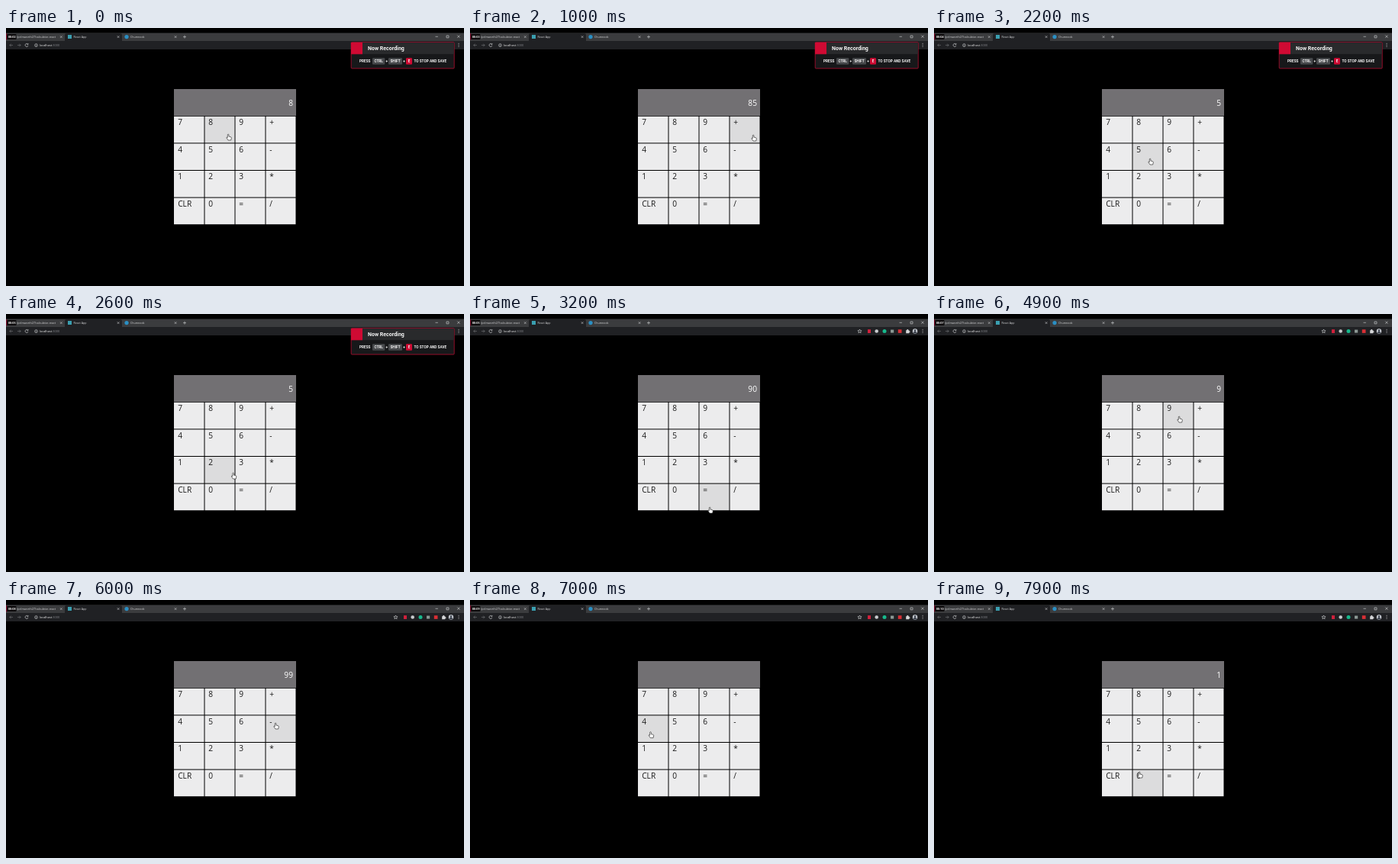
Animation, 600 px wide and 338 px high, one loop 8000 ms. Source, as an HTML page:

```html
<!DOCTYPE html>
<html lang="en">
<head>
<meta charset="utf-8">
<title>Calculator</title>
<style>
  html, body { margin: 0; width: 100%; height: 100%; overflow: hidden; background: #000; }
  svg { display: block; width: 100vw; height: 100vh; font-family: "Open Sans", "Noto Sans", sans-serif; }
  .tab { font-size: 3.6px; fill: #d6d7d9; }
  .line { fill: none; stroke: #d6d7d9; stroke-width: .6; }
  .dim { stroke: #77797d; }
  .key { fill: #ececed; }
  .key.on { fill: #dcdcdd; }
  .num { font-size: 10.2px; fill: #1b1b1b; }
  #display { fill: #fff; text-anchor: end; }
  #popup { font-family: Roboto, sans-serif; font-weight: 600; font-size: 4.7px; fill: #f4f4f4; }
</style>
</head>
<body>
<svg viewBox="0 0 600 338" preserveAspectRatio="none">
  <rect width="600" height="338"/>

  <!-- tab strip -->
  <rect y="6.5" width="600" height="10.5" fill="#3b3c3e"/>
  <path d="M77 17V9q0-2 2-2H150q2 0 2 2V17z" fill="#202124"/>
  <g class="tab">
    <text x="14" y="12.9">/pelmworth27/calculator-react</text>
    <text x="88.5" y="12.9">React App</text>
    <text x="163" y="12.9">Chumnook</text>
  </g>
  <rect x="81" y="9" width="5" height="5" fill="#3a9fb0"/>
  <circle cx="158" cy="11.6" r="2.6" fill="#2a8fc4"/>
  <path class="line" d="M71 10.3l2.6 2.6m0-2.6l-2.6 2.6M145.8 10.3l2.6 2.6m0-2.6l-2.6 2.6M220.8 10.3l2.6 2.6m0-2.6l-2.6 2.6M232 11.6h4m-2-2v4M562.5 11.3h3.4M577 10h3v2.8h-3zM591.3 9.6l3.2 3.2m0-3.2l-3.2 3.2"/>
  <rect y="8" width="13.4" height="7" fill="#0c0a0b"/>
  <rect y="7" width="1.2" height="8.5" fill="#7d1230"/>
  <text id="clock" x="3" y="12.8" font-size="3.7" font-weight="700" fill="#fff" font-family="Roboto, sans-serif"></text>

  <!-- toolbar -->
  <rect y="17" width="600" height="11" fill="#202124"/>
  <path class="line dim" d="M9 22.5H4.8m1.9-1.9l-1.9 1.9 1.9 1.9M15 22.5h4.2m-1.9-1.9l1.9 1.9-1.9 1.9"/>
  <path class="line" d="M28.7 21.3a2 2 0 1 0 .3 1.7M29 20v1.6h-1.6"/>
  <circle class="line" cx="39.5" cy="22.6" r="1.9" stroke-width=".4"/>
  <path class="line" d="M39.5 22.3v1.4M39.5 21.3v.4"/>
  <text x="44" y="24" font-size="3.9" fill="#f0f0f0">localhost<tspan fill="#85878b">:3000</tspan></text>
  <path d="M510.5 20l.7 1.7 1.9.1-1.5 1.2.5 1.8-1.6-1-1.6 1 .5-1.8-1.5-1.2 1.9-.1z" class="line" stroke-width=".5"/>
  <rect x="521" y="20.2" width="4" height="4.8" fill="#d0213c"/>
  <circle cx="532.7" cy="22.5" r="2.3" fill="#c9cbce"/>
  <circle cx="543" cy="22.5" r="2.5" fill="#17b98c"/>
  <rect x="551" y="20.6" width="4.2" height="4" fill="#8c9894"/>
  <rect x="560.8" y="20.3" width="4.7" height="4.6" fill="#d92f35"/>
  <path d="M571.2 21.2h1.3a.9.9 0 1 1 1.6 0h1.3v1.3a.8.8 0 1 1 0 1.5v1.2h-4.2z" fill="#d6d7d9"/>
  <circle cx="583" cy="22.5" r="3.2" fill="#c7cbd2"/>
  <path d="M580.6 24.7q.3-1.9 2.4-1.9t2.4 1.9q-2.4 1.6-4.8 0z" fill="#3f4550"/>
  <circle cx="583" cy="21.6" r="1.3" fill="#3f4550"/>
  <path d="M593 20.4h.1m-.1 2h.1m-.1 2h.1" stroke="#d6d7d9" stroke-width=".9" stroke-linecap="round"/>

  <g id="popup">
    <rect x="452.2" y="18.7" width="135" height="34.3" rx="1" fill="#17181a" stroke="#b50f30" stroke-width=".8"/>
    <rect x="467" y="19.2" width="119.8" height="15" fill="#292a2c"/>
    <rect x="452" y="19" width="15" height="15.3" fill="#cf0a33"/>
    <text x="474" y="29.2" font-size="7">Now Recording</text>
    <rect x="480" y="39.2" width="16.3" height="8.6" rx="1" fill="#47494c"/>
    <rect x="501" y="39.2" width="18" height="8.6" rx="1" fill="#47494c"/>
    <rect x="524" y="39.2" width="8" height="8.6" rx="1" fill="#cf0a33"/>
    <text x="463" y="45.2">PRESS</text>
    <g text-anchor="middle">
      <text x="488.2" y="45.2">CTRL</text>
      <text x="498.7" y="45.2">+</text>
      <text x="510" y="45.2">SHIFT</text>
      <text x="521.5" y="45.2">+</text>
      <text x="528" y="45.2">E</text>
    </g>
    <text x="534.5" y="45.2">TO STOP AND SAVE</text>
  </g>

  <rect x="220" y="80" width="160" height="35" fill="#727073"/>
  <text id="display" class="num" x="376" y="101.8"></text>
  <g id="keys"></g>
  <path id="hand" d="M-1.7-3.4q.8-1.1 1.6 0V-.9l2.3.5q1.2.3 1.1 1.5L2.7 4H-1L-3.1 1q-.2-1.2.8-.8l.6.5z" fill="#fff" stroke="#111" stroke-width=".6" stroke-linejoin="round"/>
</svg>
<script>
const LOOP = 8000, STEP = 100;
const LEFT = 220, TOP = 115.6, W = 40, H = 35.6;
const get = id => document.getElementById(id);

const labels = ['7', '8', '9', '+', '4', '5', '6', '-', '1', '2', '3', '*', 'CLR', '0', '=', '/'];
get('keys').innerHTML = labels.map((label, i) => {
  const x = LEFT + i % 4 * W, y = TOP + (i >> 2) * H;
  return `<rect class="key" x="${x + (i % 4 ? .5 : 0)}" y="${y + .2}" width="${i % 4 ? 39 : 39.5}" height="34.6"/>
    <text class="num" x="${x + 5.2}" y="${y + 11.6}">${label}</text>`;
}).join('');
const keys = document.querySelectorAll('.key');

// [time, x, y] of the pointer
const path = [
  [0, 292, 143], [300, 287, 168], [400, 287, 168], [650, 313, 196], [1000, 372, 144],
  [1200, 372, 144], [1800, 284, 175], [2300, 284, 175], [2900, 313, 249], [3200, 315, 257],
  [3400, 300, 266], [3800, 237, 242], [4100, 237, 242], [4600, 322, 138], [5200, 322, 138],
  [5800, 354, 165], [6200, 354, 165], [6900, 238, 171], [7300, 234, 207], [7500, 234, 207],
  [7900, 270, 229], [8000, 270, 229]
];
const readouts = [[0, '8'], [400, '85'], [1200, ''], [2200, '5'], [3100, '90'], [4000, ''],
  [4800, '9'], [5100, '99'], [6200, ''], [7500, '1']];

function pointer(t) {
  const i = path.findIndex(p => p[0] > t);
  const [t0, x0, y0] = path[i - 1], [t1, x1, y1] = path[i];
  const u = (t - t0) / (t1 - t0), e = u * u * (3 - 2 * u);
  return [x0 + (x1 - x0) * e, y0 + (y1 - y0) * e];
}

function draw(now) {
  const t = Math.floor(now % LOOP / STEP) * STEP;
  const [x, y] = pointer(t);
  get('hand').setAttribute('transform', `translate(${x} ${y})`);

  const col = Math.floor((x - .9 - LEFT) / W), row = Math.floor((y - 3.6 - TOP) / H);
  keys.forEach((key, i) => key.classList.toggle('on', i === row * 4 + col));

  get('display').textContent = readouts.filter(r => r[0] <= t).pop()[1];
  const seconds = 2 + Math.floor((t + 500) / 1000);
  get('clock').textContent = '00:' + String(seconds).padStart(2, '0');
  get('popup').style.display = t < 2800 ? '' : 'none';
  requestAnimationFrame(draw);
}
requestAnimationFrame(draw);
</script>
</body>
</html>
```
